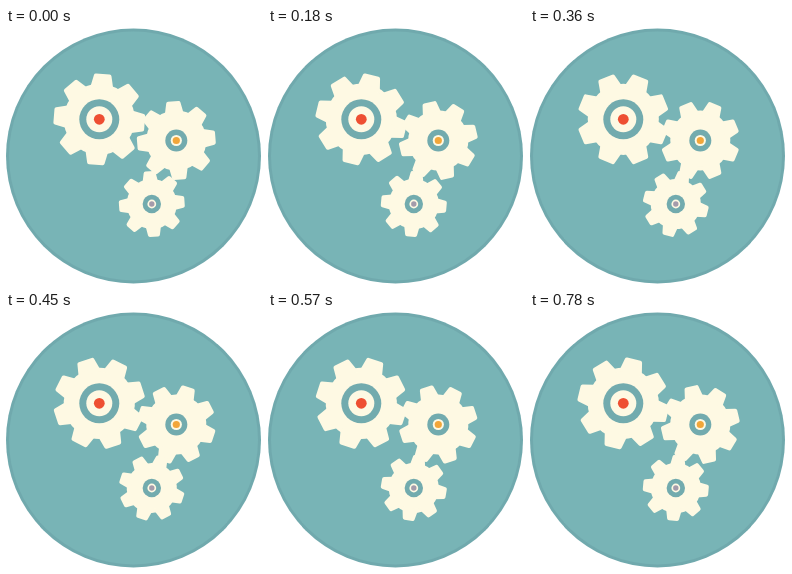
Animation, 256 px wide and 256 px high, one loop 810 ms. Source, as an HTML page:

```html
<!DOCTYPE html>
<html lang="en">
<head>
<meta charset="utf-8">
<title>Gears</title>
<style>
html, body { margin: 0; width: 100%; height: 100%; overflow: hidden; background: #fff; }
svg { display: block; width: 100vw; height: 100vh; }
</style>
</head>
<body>
<svg id="stage" viewBox="0 0 256 256">
  <circle cx="127.5" cy="128" r="127.5" fill="#70a9ad"/>
  <circle cx="127.5" cy="128" r="124.5" fill="#78b4b6"/>
</svg>
<script>
const CREAM = '#fef9e3', RING = '#72abae';
const STEP = 30, LOOP = 810, TURN = 13.5;

// tip/root: radii; top/base: half widths of a tooth; hub: [radius, colour] discs
const gears = [
  { x: 93.3, y: 91.3, tip: 45.5, root: 35.5, top: 8.8, base: 11.2, start: 4.5, dir: -1,
    hub: [[20, RING], [13, CREAM], [5.4, '#ee4f32']] },
  { x: 170.3, y: 112.5, tip: 39.2, root: 30, top: 7.2, base: 9.3, start: -4.5, dir: 1,
    hub: [[11, RING], [5.6, CREAM], [3.6, '#f2a63a']] },
  { x: 145.8, y: 176, tip: 32.8, root: 25, top: 6, base: 7.7, start: -4, dir: -1,
    hub: [[9.2, RING], [4.4, CREAM], [2.7, '#a49bab']] }
];

const stage = document.getElementById('stage');

function add(parent, tag, attrs) {
  const el = document.createElementNS('http://www.w3.org/2000/svg', tag);
  for (const key in attrs) el.setAttribute(key, attrs[key]);
  return parent.appendChild(el);
}

function build(g) {
  const group = add(stage, 'g', { transform: `translate(${g.x} ${g.y})` });
  const wheel = add(group, 'g', {
    fill: CREAM, stroke: CREAM, 'stroke-width': 4, 'stroke-linejoin': 'round'
  });
  add(wheel, 'circle', { r: g.root - 2 });
  const t = g.top - 2, b = g.base - 2;
  for (let i = 0; i < 8; i++) {
    add(wheel, 'path', {
      d: `M${-b} ${3 - g.root}L${-t} ${2 - g.tip}H${t}L${b} ${3 - g.root}Z`,
      transform: `rotate(${i * 45})`
    });
  }
  for (const [r, fill] of g.hub) add(group, 'circle', { r, fill });
  return wheel;
}

const wheels = gears.map(build);

function draw(now) {
  const step = Math.floor((now % LOOP) / STEP);
  gears.forEach((g, i) => {
    wheels[i].setAttribute('transform', `rotate(${g.start + g.dir * TURN * step})`);
  });
}

const begin = performance.now();
function tick() {
  draw(performance.now() - begin);
  requestAnimationFrame(tick);
}
tick();
</script>
</body>
</html>
```
